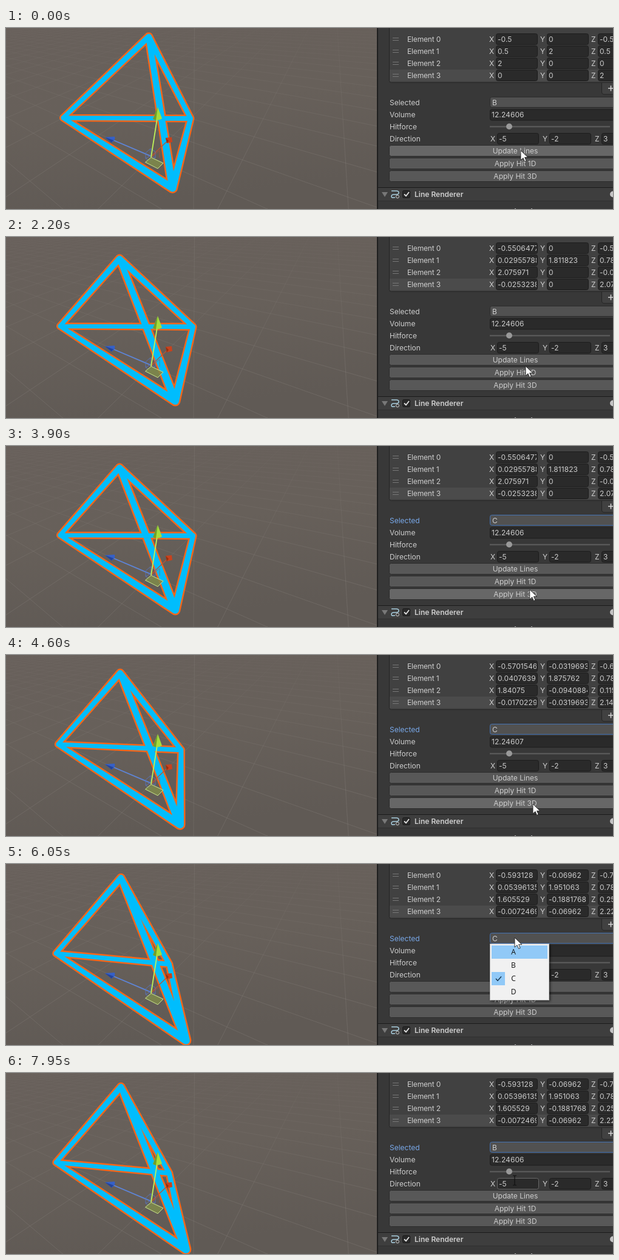
An HTML page that plays this animation: 1000 by 300 pixels, repeating every 8000 ms.

```html
<!DOCTYPE html>
<html lang="en">
<head>
<meta charset="utf-8">
<title>Tetrahedron inspector</title>
<style>
  html, body { margin: 0; width: 100%; height: 100%; overflow: hidden; background: #383838; }
  svg { display: block; width: 1000px; height: 300px; }
  text { font: 12px Inter, "Open Sans", sans-serif; fill: #cecece; white-space: pre; }
  .mid { text-anchor: middle; }
  .bold { font-weight: 600; }
  .tight { letter-spacing: -0.15px; }
  .value { letter-spacing: 0.08px; }
  .menu text { font: 12px "Open Sans", "Noto Sans", sans-serif; fill: #111; text-anchor: middle; }
</style>
</head>
<body>
<svg id="stage" viewBox="0 0 1000 300">
  <defs>
    <linearGradient id="ground" x1="0" y1="0" x2="0.25" y2="1">
      <stop offset="0" stop-color="#68605b"/>
      <stop offset="0.5" stop-color="#67605a"/>
      <stop offset="1" stop-color="#605a55"/>
    </linearGradient>
    <linearGradient id="fade" gradientUnits="userSpaceOnUse" x1="0" y1="0" x2="0" y2="230">
      <stop offset="0" stop-color="#908a85" stop-opacity="0.05"/>
      <stop offset="1" stop-color="#908a85" stop-opacity="0.28"/>
    </linearGradient>
    <clipPath id="view"><path d="M0 0H611V300H0Z"/></clipPath>
    <filter id="shadow" x="-10%" y="-10%" width="125%" height="125%">
      <feDropShadow dx="2" dy="2" stdDeviation="2" flood-opacity="0.5"/>
    </filter>
  </defs>
</svg>
<script>
const LOOP = 8000, STEP = 50;
const stage = document.getElementById('stage');

function el(tag, attrs, parent = stage, text) {
  const node = document.createElementNS('http://www.w3.org/2000/svg', tag);
  for (const key in attrs) node.setAttribute(key, attrs[key]);
  if (text !== undefined) node.textContent = text;
  parent.appendChild(node);
  return node;
}
const rect = (x, y, width, height, fill, extra, parent) =>
  el('rect', { x, y, width, height, fill, ...extra }, parent);
const path = (d, attrs, parent) => el('path', { d, fill: 'none', ...attrs }, parent);
const label = (x, y, text, attrs, parent) =>
  el('text', { x, y: y + 4.4, ...attrs }, parent, text);
const show = (node, on) => node.setAttribute('display', on ? 'inline' : 'none');

// ---- solid: a hit moves one corner, the other three grow to keep the volume ----
const DIRECTION = [-5, -2, 3], FORCE = 0.29;
const sub = (a, b) => a.map((v, k) => v - b[k]);

function volumeOf([p, q, r, s]) {
  const [a, b, c] = [sub(q, p), sub(r, p), sub(s, p)];
  return Math.abs(a[0] * (b[1] * c[2] - b[2] * c[1])
    - a[1] * (b[0] * c[2] - b[2] * c[0])
    + a[2] * (b[0] * c[1] - b[1] * c[0])) / 6;
}
function hit(pts, corner) {
  const k = FORCE / Math.hypot(...DIRECTION);
  const moved = pts.map((p, i) => i === corner ? p.map((v, n) => v + DIRECTION[n] * k) : p);
  const rest = pts.filter((_, i) => i !== corner);
  const centre = [0, 1, 2].map(n => (rest[0][n] + rest[1][n] + rest[2][n]) / 3);
  const grow = Math.sqrt(volumeOf(pts) / volumeOf(moved));
  return moved.map((p, i) => i === corner ? p : p.map((v, n) => centre[n] + (v - centre[n]) * grow));
}

const hits = [[1200, 1], [1500, 1], [4250, 2], [4750, 2]];
const poses = [[[-0.5, 0, -0.5], [0.5, 2, 0.5], [2, 0, 0], [0, 0, 2]]];
hits.forEach(([, corner], i) => poses.push(hit(poses[i], corner)));

// Camera: returns screen x, y and depth
function project([x, y, z]) {
  const w = 1 + 0.1374 * x - 0.06 * y + 0.1942 * z;
  return [(239 + 74.3 * x - 1.6 * y - 54.2 * z) / w, (214 - 11.4 * x - 95.7 * y - 3.6 * z) / w, w];
}

// ---- scene view ----
const view = el('g', { 'clip-path': 'url(#view)' });
rect(0, 0, 612, 300, 'url(#ground)', {}, view);

function gridLine(at) {
  let d = '';
  for (let s = -12; s <= 40; s += 0.5) {
    const [x, y, w] = project(at(s));
    if (w > 0.12) d += `${d ? 'L' : 'M'}${x.toFixed(1)} ${y.toFixed(1)}`;
  }
  path(d, { stroke: 'url(#fade)' }, view);
}
for (let n = -10; n <= 18; n++) {
  gridLine(s => [n, 0, s]);
  gridLine(s => [s, 0, n]);
}
path('M310.5 0L309 300', { stroke: '#8a847e', 'stroke-opacity': 0.28 }, view);

const outline = path('', { stroke: '#f4661a', 'stroke-width': 5, 'stroke-linejoin': 'round' }, view);
const body = path('', { fill: '#00bdfd' }, view);

// Six tapered bars with round corners, thicker when nearer
function bars(pts) {
  const ends = pts.map(project);
  let d = '';
  ends.forEach(([x, y, w], i) => {
    const r = 5 / w;
    d += `M${x - r} ${y}a${r} ${r} 0 0 0 ${2 * r} 0a${r} ${r} 0 0 0 ${-2 * r} 0Z`;
    ends.slice(i + 1).forEach(([u, v, depth]) => {
      const q = 5 / depth, len = Math.hypot(u - x, v - y);
      const nx = (y - v) / len, ny = (u - x) / len;
      d += `M${x + nx * r} ${y + ny * r}L${u + nx * q} ${v + ny * q}` +
           `L${u - nx * q} ${v - ny * q}L${x - nx * r} ${y - ny * r}Z`;
    });
  });
  return d;
}

// Move gizmo
path('M239 213L264 189', { stroke: '#c2502d', 'stroke-width': 1.2 }, view);
path('M238 212L177 186', { stroke: '#5b86e0', 'stroke-width': 1.6 }, view);
path('M230 207L238 200L246 205V215L238 221L230 216ZM238 200V212L230 216M238 212L246 215',
  { stroke: '#5577cc', 'stroke-opacity': 0.8 }, view);
path('M240 214L253 203V215', { stroke: '#c2502d', 'stroke-opacity': 0.7 }, view);
path('M229.5 222.5L239 214.5L259 224L250 233Z',
  { fill: '#7f8a4a', 'fill-opacity': 0.85, stroke: '#c9e58a' }, view);
path('M239 214L249 150', { stroke: '#bdf25a', 'stroke-width': 1.8 }, view);
path('M250 131L257 150Q250 155 242 151Z', { fill: '#a5dc3c' }, view);
path('M250 131L247 153L242 151Z', { fill: '#6f9f2b' }, view);
path('M163 181L179 180Q181 186 174 190Z', { fill: '#3560c8' }, view);
path('M163 181L174 190L177 186Z', { fill: '#24449a' }, view);
path('M263 182L273 181L274 189L265 191Z', { fill: '#c8421d' }, view);
path('M263 182L265 191L268 187Z', { fill: '#97300f' }, view);

// ---- inspector ----
rect(611, 0, 389, 300, '#383838');
rect(611, 0, 2, 300, '#1f1f1f');
rect(631.5, -5, 380, 95.5, '#414141', { rx: 3, stroke: '#252525' });
rect(632, 69, 370, 19, '#4b4b4b');
path('M981.5 91V106Q981.5 110 986 110H1000V91Z', { fill: '#414141' });
path('M981.5 91V106Q981.5 110 986 110H1000', { stroke: '#252525' });
path('M992 100H1000M996.5 95.5V104.5', { stroke: '#d5d5d5', 'stroke-width': 1.6 });

// A text field that clips its value
function field(x, y, w, text) {
  const box = rect(x + 0.5, y - 9, w - 1, 18, '#2a2a2a', { rx: 3, stroke: '#1c1c1c' });
  const clip = el('svg', { x, y: y - 9, width: w - 2, height: 18 });
  return { box, value: label(3, 9, text, { class: 'value' }, clip) };
}
// Three labelled fields, as for a vector
const vector = (x, y, pitch, values) => [...'XYZ'].map((axis, i) => {
  label(x + pitch * i - 11, y, axis);
  return field(x + pitch * i, y, 69, values[i]);
});

const cells = poses[0].map((p, i) => {
  const y = 18.5 + 20 * i;
  path(`M637 ${y - 2}h10m-10 4h10`, { stroke: '#777' });
  label(661, y, 'Element ' + i, { class: 'tight' });
  return vector(807, y, 84, p);
});

['Selected', 'Volume', 'Hitforce', 'Direction'].forEach((name, i) =>
  label(632, 124 + 20 * i, name, { id: name }));
const title = document.getElementById('Selected');
const drop = rect(797.5, 114.5, 220, 17, '#515151', { rx: 3 });
const choice = label(801, 123.5, '');
const volume = field(797, 144, 220, '').value;
rect(797, 162.5, 198, 2, '#5e5e5e');
const thumb = el('circle', { cx: 829, cy: 163.3, r: 5 });
const dirX = vector(809, 183.5, 86, DIRECTION)[0].box;

const buttons = ['Update Lines', 'Apply Hit 1D', 'Apply Hit 3D'].map((name, i) => {
  const y = 203.6 + 21 * i;
  const box = rect(631.5, 194.5 + 21 * i, 414, 18, '#585858', { rx: 3, stroke: '#2c2c2c' });
  label(839, y, name, { class: 'mid' });
  return { box, y };
});

rect(613, 264, 387, 23, '#3e3e3e');
rect(613, 264, 387, 1, '#1a1a1a');
rect(613, 286, 387, 1, '#303030');
path('M619 272H629L624 280Z', { fill: '#787878' });
path('M635 270H643Q647 270 647 273T643 276H639Q635 276 635 279T639 281H641',
  { stroke: '#a9cfe0', 'stroke-width': 1.5 });
el('circle', { cx: 645, cy: 279.5, r: 2.5, fill: 'none', stroke: '#d0d0d0' });
rect(653.5, 269.5, 12, 12, '#2a2a2a', { rx: 2, stroke: '#1a1a1a' });
path('M656 275.5L659 278.5L664 272', { stroke: '#e4e4e4', 'stroke-width': 1.8 });
label(673, 275.5, 'Line Renderer', { class: 'bold' });
el('circle', { cx: 1000, cy: 275.5, r: 5, fill: '#c4c4c4' });
path('M838 299.5h2m25 0h2', { stroke: '#aaa' });

// ---- dropdown menu ----
const ROW = 22, TOP = 135;
const menu = el('g', { class: 'menu' });
rect(797.5, 132.5, 97, 93, '#f1f1f1', { stroke: '#bdbdbd', filter: 'url(#shadow)' }, menu);
const hot = rect(800, TOP, 92, ROW, '#91c9f7', {}, menu);
const mark = el('g', {}, menu);
rect(800, TOP, ROW, ROW, '#91c9f7', {}, mark);
path('M807 146L810 149.5L816 142.5', { stroke: '#16324a', 'stroke-width': 1.4 }, mark);
[...'ABCD'].forEach((c, i) => label(836, TOP + 11 + ROW * i, c, {}, menu));

// ---- pointer: glides that end at a given time and place ----
const arrow = path('M0 0V16L4 12.4L6.6 18.4L9.2 17.3L6.6 11.4H11.8Z',
  { fill: '#fff', stroke: '#222', 'stroke-width': 0.9 });
const beam = path('M-3 -8H-1L0 -7L1 -8H3M0 -7V7M-3 8H-1L0 7L1 8H3', { stroke: '#111', 'stroke-width': 1.2 });

const GLIDE = 400;
const stops = [
  [500, 862, 243], [1000, 852, 244], [1950, 856, 214], [2600, 838, 124],
  [3200, 827, 166], [3600, 835, 190], [4000, 868, 247], [5300, 814, 154],
  [5850, 838, 122], [6600, 836, 160], [7600, 838, 178]
];
function pointer(t) {
  let x = 848, y = 203;
  for (const [end, u, v] of stops) {
    const k = Math.min(1, Math.max(0, (t - end) / GLIDE + 1)), e = k * k * (3 - 2 * k);
    x += (u - x) * e;
    y += (v - y) * e;
  }
  return [x, y];
}

const menus = [[2850, 3600], [6000, 7200]];
const pick = { from: 3600, to: 7200 };
let drawn = -1;

function drawSolid(n) {
  const d = bars(poses[n]);
  outline.setAttribute('d', d);
  body.setAttribute('d', d);
  cells.forEach((row, i) => row.forEach((cell, k) =>
    cell.value.textContent = +poses[n][i][k].toPrecision(7)));
  volume.textContent = n === 3 ? '12.24607' : '12.24606';
  drawn = n;
}

function draw(t) {
  const n = hits.filter(([at]) => t >= at).length;
  if (n !== drawn) drawSolid(n);

  const [x, y] = pointer(t);
  const open = menus.some(([a, b]) => t >= a && t < b);
  const picked = t >= pick.from && t < pick.to ? 'C' : 'B';
  const focused = t >= pick.from;
  choice.textContent = picked;
  title.style.fill = focused ? '#79a9ea' : '';
  drop.setAttribute('stroke', focused ? '#4473b4' : '#2c2c2c');

  // The highlight trails the pointer a little
  show(menu, open);
  const row = Math.min(3, Math.max(0, Math.floor((pointer(t - 150)[1] - TOP) / ROW)));
  hot.setAttribute('y', TOP + ROW * row);
  mark.setAttribute('transform', `translate(0 ${ROW * 'ABCD'.indexOf(picked)})`);

  buttons.forEach(b => b.box.setAttribute('fill', !open && Math.abs(y - b.y) < 9 ? '#676767' : '#585858'));
  const typing = t > pick.to && y > 172;
  const onSlider = !open && !typing && Math.abs(y - 158) < 9;
  thumb.setAttribute('fill', onSlider ? '#ececec' : '#999');
  dirX.setAttribute('stroke', typing ? '#686868' : '#1c1c1c');
  show(arrow, !typing);
  show(beam, typing);
  (typing ? beam : arrow).setAttribute('transform', `translate(${x.toFixed(1)} ${y.toFixed(1)})`);
}

const start = performance.now();
function tick(now) {
  const t = Math.max(0, now - start) % LOOP;
  draw(Math.floor(t / STEP) * STEP);
  requestAnimationFrame(tick);
}
draw(0);
requestAnimationFrame(tick);
</script>
</body>
</html>
```
